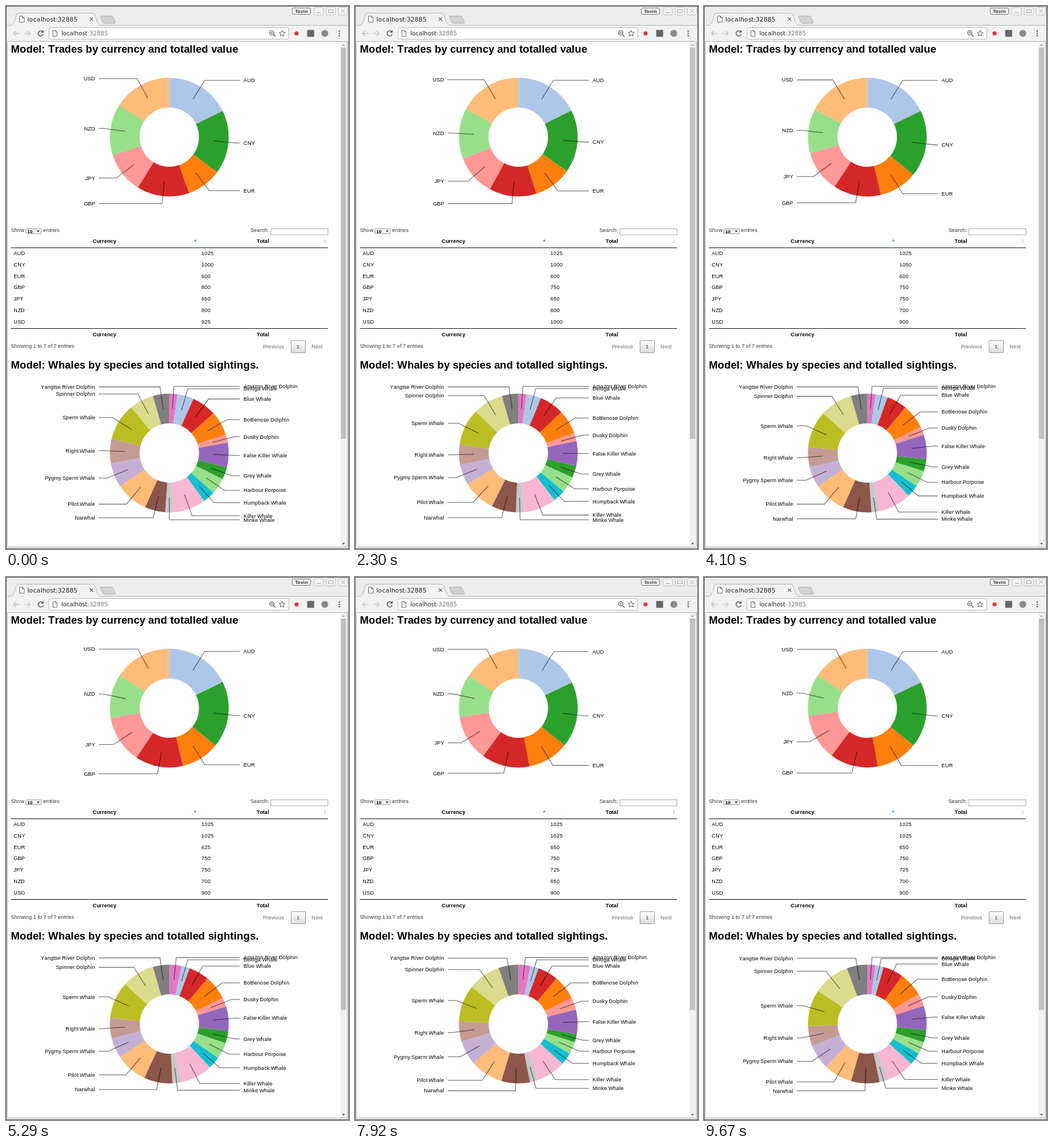
Recreate the animation shown at these times as an HTML page. Size 595 px wide and 942 px high, loop 9710 ms.

```html
<!DOCTYPE html>
<html lang="en">
<head>
<meta charset="utf-8">
<title>localhost:32885</title>
<style>
  html, body { margin: 0; width: 100%; height: 100%; overflow: hidden; background: #fff; }
  svg { display: block; }
  text { font: 12px "Liberation Sans", Arial, sans-serif; fill: #000; }
  .bold { font-weight: bold; }
  .soft { fill: #333; }
  .dim { fill: #666; }
  .mid { text-anchor: middle; }
  .title { font-size: 24px; font-weight: bold; }
  .ui { font-family: "DejaVu Sans", sans-serif; }
  .tab { font-size: 14px; fill: #222; }
  polyline { fill: none; stroke: #000; stroke-width: 1.3; opacity: .52; }
</style>
</head>
<body>
<svg id="stage" width="595" height="942" viewBox="0 0 595 942">
  <defs>
    <linearGradient id="btn" x2="0" y2="1"><stop stop-color="#fff"/><stop offset="1" stop-color="#dcdcdc"/></linearGradient>
  </defs>
  <!-- window -->
  <rect width="595" height="942" fill="#ededed"/>
  <rect x=".5" y=".5" width="594" height="941" fill="none" stroke="#4c4c4c"/>
  <rect x="2" y="33" width="591" height="29" fill="#f2f2f2"/>
  <path d="M2 33.5H8C12 33 13 30 15 25L18 15Q19 12.5 22 12.5H150Q153 12.5 154 15L158 26C160 31 161 33 165 33.5H593" fill="#f2f2f2" stroke="#b4b4b4"/>
  <path d="M165 17.5H183Q185 17.5 186 19.5L189.5 28Q190 30 188 30H171Q169 30 168 28L164 19.5Q163.5 17.5 165 17.5Z" fill="#d2d2d2" stroke="#b0b0b0"/>
  <path d="M23.5 17.5H28.5L31.5 20.5V28H23.5ZM28.5 17.5V20.5H31.5" fill="#fff" stroke="#666"/>
  <path d="M145.5 20L151 25.5M151 20L145.5 25.5" stroke="#666" stroke-width="1.2"/>
  <rect x="496.5" y="3.5" width="32" height="11" rx="2.5" fill="#f2f2f2" stroke="#777"/>
  <text class="ui bold mid" x="512.5" y="12" style="font-size:7.5px;fill:#444">Tovin</text>
  <g fill="#f2f2f2" stroke="#c2c2c2">
    <rect x="534.5" y="2.5" width="16" height="13" rx="2"/>
    <rect x="555.5" y="2.5" width="16" height="13" rx="2"/>
    <rect x="576.5" y="2.5" width="16" height="13" rx="2"/>
    <path d="M539 11.5H546M559.5 6.5H567.5V11.5H559.5ZM581 5.5L588 12.5M588 5.5L581 12.5" stroke="#aaa"/>
  </g>
  <!-- toolbar -->
  <g fill="none" stroke-width="1.5">
    <path d="M23 47.5H13M17.5 43L13 47.5L17.5 52" stroke="#c4c4c4"/>
    <path d="M32 47.5H42M37.5 43L42 47.5L37.5 52" stroke="#c9c9c9"/>
    <path d="M64 45A4.5 4.5 0 1 0 64.5 49M64.5 42V45.5H61" stroke="#5c5c5c"/>
  </g>
  <rect x="74.5" y="37.5" width="416" height="20" rx="2.5" fill="#fff" stroke="#b8b8b8"/>
  <path d="M81.5 42.5H86L88.5 45V52.5H81.5ZM86 42.5V45H88.5" fill="#fff" stroke="#666"/>
  <text class="ui" x="96" y="51" style="font-size:10.1px;fill:#222">localhost<tspan fill="#777">:32885</tspan></text>
  <path d="M464 49.5L467.5 53M459 46.5H463" stroke="#555" stroke-width="1.4"/>
  <circle cx="461" cy="46.5" r="3.7" fill="none" stroke="#555" stroke-width="1.2"/>
  <path d="M479 42.3L480.5 45.7L484.2 46L481.4 48.5L482.3 52L479 50.2L475.7 52L476.6 48.5L473.8 46L477.5 45.7Z" fill="none" stroke="#555"/>
  <circle cx="504" cy="47.5" r="3.5" fill="#e53238"/>
  <rect x="522.5" y="41.5" width="12" height="12" rx="1" fill="#666"/>
  <circle cx="553" cy="47.5" r="6" fill="#8a8a8a"/>
  <g fill="#555"><circle cx="578" cy="43.5" r="1.2"/><circle cx="578" cy="47.5" r="1.2"/><circle cx="578" cy="51.5" r="1.2"/></g>
  <!-- page and scrollbar -->
  <rect x="2.5" y="61.5" width="590" height="877" fill="#fff" stroke="#b4b4b4"/>
  <rect x="580" y="62" width="12" height="876" fill="#f1f1f1"/>
  <rect x="581" y="72" width="9" height="679" fill="#c1c1c1"/>
  <path d="M583 69L585.5 66L588 69Z" fill="#a3a3a3"/>
  <path d="M583 931.5L585.5 934.5L588 931.5Z" fill="#505050"/>
  <!-- table frame -->
  <rect x="34.5" y="386.5" width="27" height="8.5" rx="1" fill="#efefef" stroke="#a0a0a0"/>
  <text class="bold" x="37" y="393.5" style="font-size:8px">10</text>
  <path d="M53.5 389.5H58L55.75 392.5Z" fill="#222"/>
  <rect x="459.5" y="386.5" width="99" height="10.5" fill="#fff" stroke="#a9a9a9"/>
  <path d="M325.8 408.2L328.3 404.5L330.8 408.2Z" fill="#4a9fc4"/>
  <path d="M551 407.5L553 404.5L555 407.5ZM551 409L553 412L555 409Z" fill="#ccc"/>
  <path d="M8.5 419.5H558.5M8.5 559.5H558.5" stroke="#111"/>
  <rect x="494.5" y="580.5" width="25" height="21" rx="1.5" fill="url(#btn)" stroke="#979797"/>
</svg>
<script>
const LOOP = 9710, FADE = 500, R = 128.75, CX = 283.3, ZOOM = .764;
const stage = document.getElementById("stage");
const pen = document.createElement("canvas").getContext("2d");

function add(markup) {
  stage.insertAdjacentHTML("beforeend", markup);
  return stage.lastElementChild;
}

// Text is set with whole-pixel advances, then zoomed with the page.
function spell(el, str) {
  pen.font = getComputedStyle(el).font;
  let width = 0;
  const xs = [...str].map(c => {
    const x = width;
    width += Math.round(pen.measureText(c).width);
    return x;
  });
  el.textContent = str;
  el.setAttribute("x", xs.join(" "));
  el.span = width * ZOOM;
}

// anchor: 0 start, .5 middle, 1 end
function place(el, x, y, anchor = 0) {
  el.setAttribute("transform", `translate(${x - anchor * el.span} ${y}) scale(${ZOOM})`);
}

function type(style, str, x, y, anchor) {
  const el = add(`<text class="${style}"></text>`);
  spell(el, str);
  place(el, x, y, anchor);
  return el;
}

// Each step: time, then pairs of slice index and change.
const trades = {
  cy: 227.4,
  names: "AUD,CNY,EUR,GBP,JPY,NZD,USD",
  colors: "aec7e8 2ca02c ff7f0e d62728 ff9896 98df8a ffbb78",
  start: [1025, 1000, 550, 825, 650, 800, 925],
  steps: [
    [0, 2, 50, 3, -25],
    [1030, 3, -50, 6, 75],
    [2500, 1, 50, 5, -50],
    [3500, 5, -50],
    [4090, 4, 100, 6, -100],
    [5100, 1, -25, 2, 25],
    [6130, 4, -50],
    [7660, 2, 25, 4, 25, 5, -50],
    [9660, 5, 50]
  ]
};
const whales = {
  cy: 775.5,
  names: "Amazon River Dolphin,Beluga Whale,Blue Whale,Bottlenose Dolphin,Dusky Dolphin,False Killer Whale," +
    "Grey Whale,Harbour Porpoise,Humpback Whale,Killer Whale,Minke Whale,Narwhal,Pilot Whale," +
    "Pygmy Sperm Whale,Right Whale,Sperm Whale,Spinner Dolphin,Yangtse River Dolphin",
  colors: "e377c2 aec7e8 d62728 ff7f0e ff9896 9467bd 2ca02c 98df8a 17becf f7b6d2 c7c7c7 8c564b ffbb78 c5b0d5 c49c94 bcbd22 dbdb8d 7f7f7f",
  start: [2, 4, 6, 6, 2, 6, 3, 4, 3, 8, 2, 5, 8, 6, 6, 9, 6, 4],
  steps: [
    [30, 13, -1, 16, 1],
    [1030, 14, -1, 11, 1],
    [2070, 1, -1, 16, 1],
    [3070, 2, -1, 11, 1],
    [4090, 1, -1, 0, 1],
    [5100, 4, 1, 12, -1],
    [6050, 6, -1, 7, -1, 12, 1, 13, 1],
    [7590, 9, -1, 17, 1],
    [8350, 0, -1, 16, 1],
    [9100, 12, -1, 6, 1]
  ]
};

const shares = values => {
  const sum = values.reduce((a, b) => a + b);
  return values.map(v => v / sum);
};

function setup(chart) {
  chart.names = chart.names.split(",");
  let values = chart.start;
  chart.states = [{ time: -FADE, values, parts: shares(values) }];
  for (const [time, ...moves] of chart.steps) {
    values = values.slice();
    for (let i = 0; i < moves.length; i += 2) values[moves[i]] += moves[i + 1];
    chart.states.push({ time, values, parts: shares(values) });
  }
  chart.slices = chart.colors.split(" ").map(c => add(`<path fill="#${c}"/>`));
  chart.labels = chart.names.map(n => type("", n, 0, 0));
  chart.lines = chart.names.map(() => add("<polyline/>"));
}

const ease = p => p < .5 ? 4 * p ** 3 : 1 - 4 * (1 - p) ** 3;

function draw(chart, t) {
  let k = chart.states.length - 1;
  while (k && chart.states[k].time > t) k--;
  const now = chart.states[k], old = chart.states[Math.max(0, k - 1)];
  const p = ease(Math.min(1, (t - now.time) / FADE));
  const at = (r, a) => `${(CX + r * Math.sin(a)).toFixed(2)},${(chart.cy - r * Math.cos(a)).toFixed(2)}`;
  const outer = .8 * R, inner = .4 * R;
  let a = 0;
  now.parts.forEach((part, i) => {
    const b = a + 2 * Math.PI * (old.parts[i] + (part - old.parts[i]) * p);
    const mid = (a + b) / 2, right = mid < Math.PI + 1e-6, side = right ? 1 : -1;
    const y = chart.cy - .9 * R * Math.cos(mid);
    chart.slices[i].setAttribute("d",
      `M${at(outer, a)}A${outer} ${outer} 0 0 1 ${at(outer, b)}L${at(inner, b)}A${inner} ${inner} 0 0 0 ${at(inner, a)}Z`);
    chart.lines[i].setAttribute("points", `${at(.6 * R, mid)} ${at(.9 * R, mid)} ${CX + side * .95 * R},${y}`);
    place(chart.labels[i], CX + side * R, y + 3.2, right ? 0 : 1);
    a = b;
  });
  return now.values;
}

setup(trades);
setup(whales);

type("ui tab", "localhost:32885", 37, 27);
type("title", "Model: Trades by currency and totalled value", 8.4, 81);
type("title", "Model: Whales by species and totalled sightings.", 8.4, 629);
type("soft", "Show", 8.4, 392.3);
type("soft", "entries", 64.5, 392.3);
type("soft", "Search:", 456, 392.3, 1);
type("soft", "Showing 1 to 7 of 7 entries", 8.4, 593.3);
type("dim", "Previous", 445.7, 593.8);
type("soft", "1", 507, 593.8, .5);
type("dim", "Next", 530, 593.8);
for (const y of [410.7, 572.5]) {
  type("bold", "Currency", 171, y, .5);
  type("bold", "Total", 445.5, y, .5);
}
const cells = trades.names.map((name, i) => {
  const y = 431.8 + i * 19.87;
  type("", name, 13.3, y);
  return type("", "", 339, y);
});

function frame() {
  const t = performance.now() % LOOP;
  draw(trades, t).forEach((v, i) => {
    if (cells[i].textContent !== String(v)) spell(cells[i], String(v));
  });
  draw(whales, t);
  requestAnimationFrame(frame);
}
frame();
</script>
</body>
</html>
```
